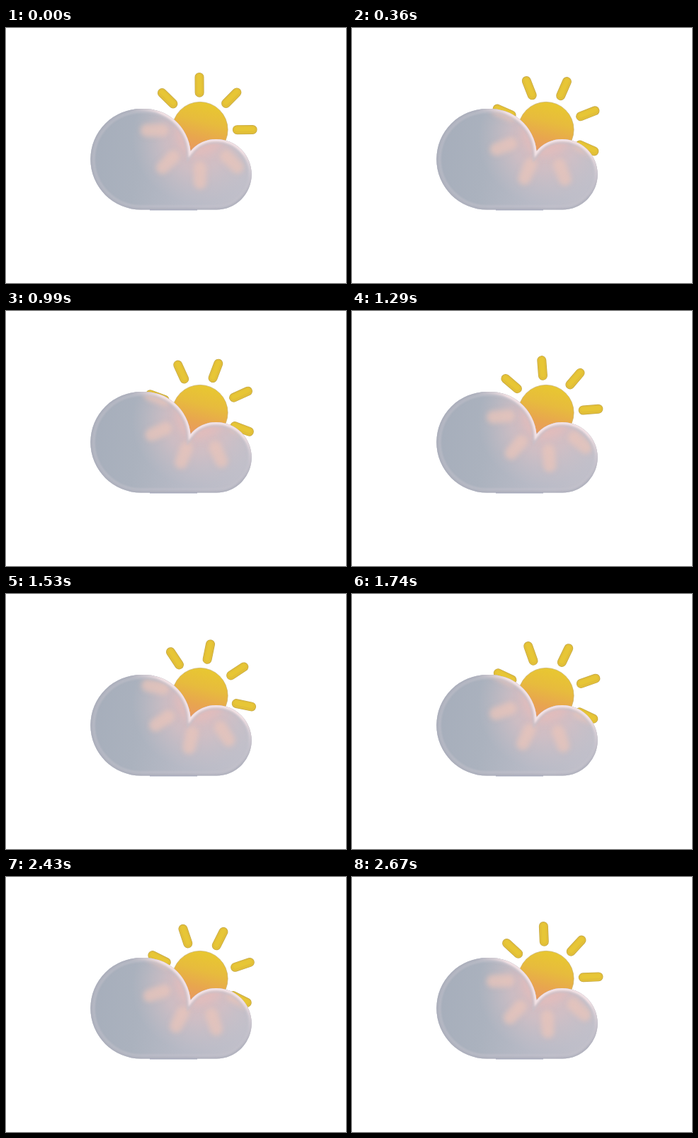
Write an HTML page that moves like this. It is 480 by 360 pixels and loops after 2700 ms.

```html
<!DOCTYPE html>
<html lang="en">
<head>
<meta charset="utf-8">
<title>Sun behind a cloud</title>
<style>
  html, body { margin: 0; width: 100%; height: 100%; overflow: hidden; background: #fff; }
  svg { display: block; width: 100vw; height: 100vh; }
</style>
</head>
<body>
<svg viewBox="0 0 480 360">
  <defs>
    <path id="cloud" d="M190.5 256.5A71.2 71.2 0 0 1 190.5 114.1A66 66 0 0 1 260.5 174A46 46 0 0 1 297 157A49.6 49.6 0 0 1 297 256.5Z"/>
    <clipPath id="inside"><use href="#cloud"/></clipPath>
    <linearGradient id="body" gradientUnits="userSpaceOnUse" x1="120" y1="175" x2="346" y2="215">
      <stop offset="0" stop-color="#a6aebb"/>
      <stop offset=".3" stop-color="#abb2be"/>
      <stop offset=".62" stop-color="#b8bac6"/>
      <stop offset="1" stop-color="#c2c0ca"/>
    </linearGradient>
    <linearGradient id="disc" gradientUnits="userSpaceOnUse" x1="282" y1="104" x2="264" y2="176">
      <stop offset="0" stop-color="#e8c830"/>
      <stop offset=".38" stop-color="#e7bb3d"/>
      <stop offset=".7" stop-color="#e8a64e"/>
      <stop offset="1" stop-color="#e89863"/>
    </linearGradient>
    <radialGradient id="warm" gradientUnits="userSpaceOnUse" cx="270" cy="156" r="92">
      <stop offset="0" stop-color="#e4bdbd" stop-opacity=".85"/>
      <stop offset=".5" stop-color="#dcc0c3" stop-opacity=".6"/>
      <stop offset="1" stop-color="#d0c2c8" stop-opacity="0"/>
    </radialGradient>
    <radialGradient id="edge" gradientUnits="userSpaceOnUse" cx="275" cy="150" r="106">
      <stop offset=".6" stop-color="#f3e2e5"/>
      <stop offset="1" stop-color="#f0e2e6" stop-opacity="0"/>
    </radialGradient>
    <filter id="soft" filterUnits="userSpaceOnUse" x="100" y="40" width="280" height="240"><feGaussianBlur stdDeviation="3.6"/></filter>
    <filter id="haze" filterUnits="userSpaceOnUse" x="100" y="40" width="280" height="240"><feGaussianBlur stdDeviation="6"/></filter>
    <filter id="fine" filterUnits="userSpaceOnUse" x="100" y="40" width="280" height="240"><feGaussianBlur stdDeviation=".8"/></filter>
  </defs>

  <g id="rays"></g>
  <circle cx="273.9" cy="143.6" r="39.2" fill="url(#disc)" stroke="#c4ad68" stroke-width=".7"/>

  <use href="#cloud" fill="url(#body)"/>
  <g clip-path="url(#inside)">
    <circle cx="270" cy="156" r="92" fill="url(#warm)"/>
    <circle cx="274" cy="146" r="35" fill="#e6bcb9" opacity=".6" filter="url(#haze)"/>
    <g filter="url(#soft)" opacity=".75"><g id="glow"></g></g>
    <use href="#cloud" fill="none" stroke="#c4c2cc" stroke-width="13" opacity=".5" filter="url(#fine)"/>
    <use href="#cloud" fill="none" stroke="#a4a7b5" stroke-width="5" opacity=".55" filter="url(#fine)"/>
    <use href="#cloud" fill="none" stroke="url(#edge)" stroke-width="7" filter="url(#fine)"/>
  </g>
  <path d="M203 256.9H270" stroke="#8f93ac" stroke-width=".9"/>
</svg>
<script>
const NS = 'http://www.w3.org/2000/svg';
const LOOP = 2700, STEP = 30, TURN = 180;
const CX = 273.5, CY = 144, NEAR = 52.8, FAR = 74.6;
const rays = document.getElementById('rays');
const glow = document.getElementById('glow');
const spokes = [];

function line(parent, color, width) {
  const el = document.createElementNS(NS, 'line');
  el.setAttribute('stroke', color);
  el.setAttribute('stroke-width', width);
  el.setAttribute('stroke-linecap', 'round');
  parent.append(el);
  return el;
}

function place(el, angle, dy = 0) {
  const s = Math.sin(angle), c = Math.cos(angle);
  el.setAttribute('x1', CX + NEAR * s);
  el.setAttribute('y1', CY - NEAR * c + dy);
  el.setAttribute('x2', CX + FAR * s);
  el.setAttribute('y2', CY - FAR * c + dy);
}

for (let i = 0; i < 8; i++) {
  spokes.push({
    rim: line(rays, '#c2a748', 13),
    face: line(rays, '#e2bf38', 11.6),
    shine: line(rays, '#e7c636', 6),
    blur: line(glow, '#e8c4ba', 18)
  });
}

function draw(ms) {
  const t = Math.floor((ms % LOOP) / STEP + 1e-3) * STEP;
  const turn = TURN * t / LOOP - 0.4;
  spokes.forEach((p, i) => {
    const a = (turn + 45 * i) * Math.PI / 180;
    place(p.rim, a);
    place(p.face, a);
    place(p.shine, a, -1);
    place(p.blur, a);
  });
}

let start = null;
function tick(now) {
  if (start === null) start = now;
  draw(Math.max(0, now - start));
  requestAnimationFrame(tick);
}
draw(0);
requestAnimationFrame(tick);
</script>
</body>
</html>
```
